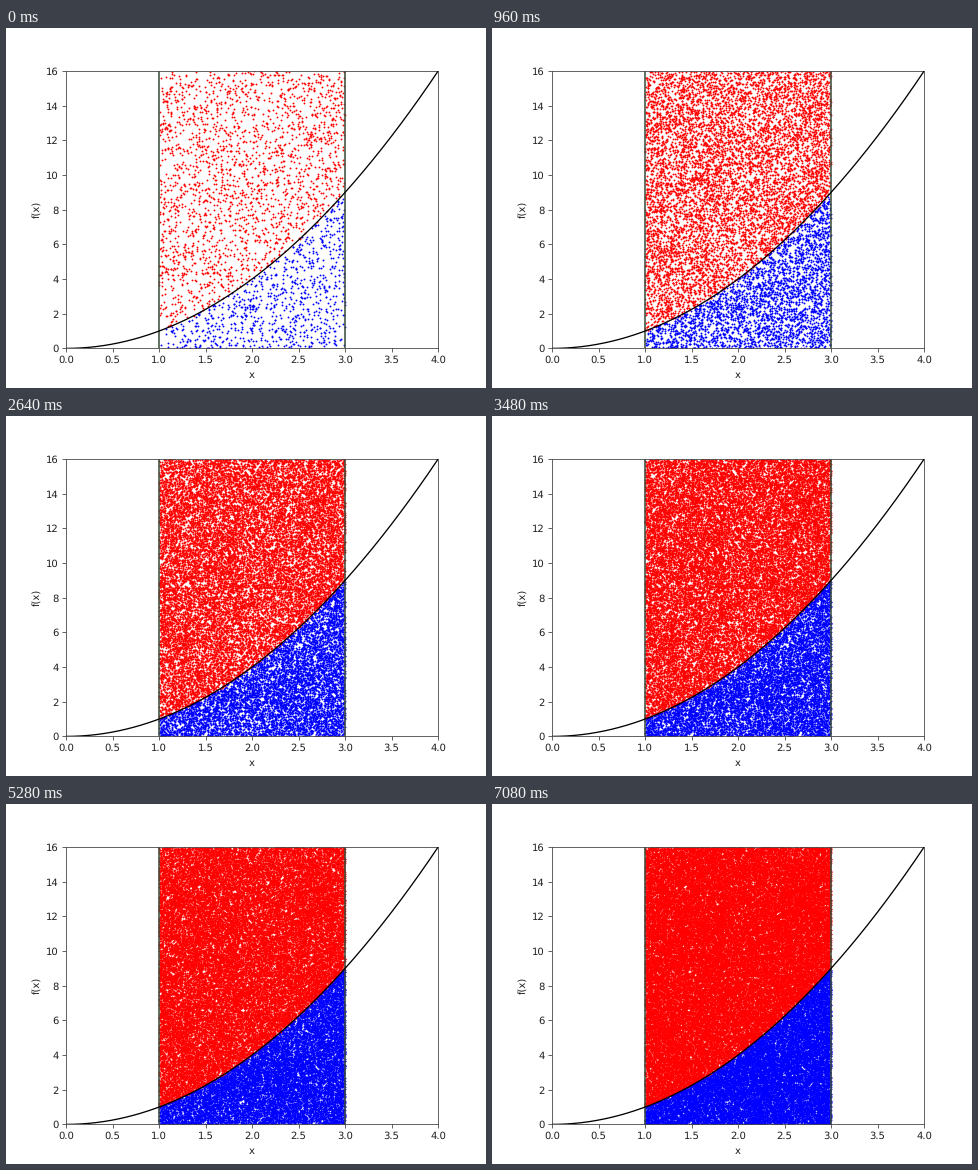
Recreate the animation shown at these times as a matplotlib script. Size 480x360 px, loop 7.2 s.

```python
import numpy as np
import matplotlib.pyplot as plt
from matplotlib.animation import FuncAnimation

FRAMES, INTERVAL = 60, 120
BATCH = 1000            # new samples per frame
START = 3               # batches already visible at the beginning
LOW, HIGH, TOP = 1, 3, 16
INK = "#484848"

plt.rcParams.update({
    "text.hinting": "no_hinting",
    "text.hinting_factor": 1,
    "axes.edgecolor": INK,
    "xtick.color": INK,
    "ytick.color": INK,
    "xtick.labelcolor": "#202020",
    "ytick.labelcolor": "#202020",
    "axes.labelcolor": "#202020",
})


def f(x):
    return x ** 2


rng = np.random.default_rng(7)
total = (FRAMES + START - 1) * BATCH
px = rng.uniform(LOW, HIGH, total)
py = rng.uniform(0, TOP, total)
under = py < f(px)

fig, ax = plt.subplots(figsize=(6.4, 4.8), dpi=75)
ax.set(xlim=(0, 4), ylim=(0, TOP))
ax.set_xlabel("x", labelpad=4.5)
ax.set_ylabel("f(x)")


def dots(color):
    return ax.plot([], [], "o", color=color, markersize=1.8,
                   markeredgewidth=0, zorder=1)[0]


above_dots, under_dots = dots("red"), dots("blue")

for edge in (LOW, HIGH):
    ax.plot([edge, edge], [0, TOP], color="#3a4c3a", lw=1.5, zorder=2)
xs = np.linspace(0, 4, 200)
ax.plot(xs, f(xs), color="black", lw=1.25, zorder=3)


def update(frame):
    count = (frame + START) * BATCH
    x, y, hit = px[:count], py[:count], under[:count]
    above_dots.set_data(x[~hit], y[~hit])
    under_dots.set_data(x[hit], y[hit])
    return above_dots, under_dots


anim = FuncAnimation(fig, update, frames=FRAMES, interval=INTERVAL,
                     repeat=True, repeat_delay=0)
plt.show()
```
